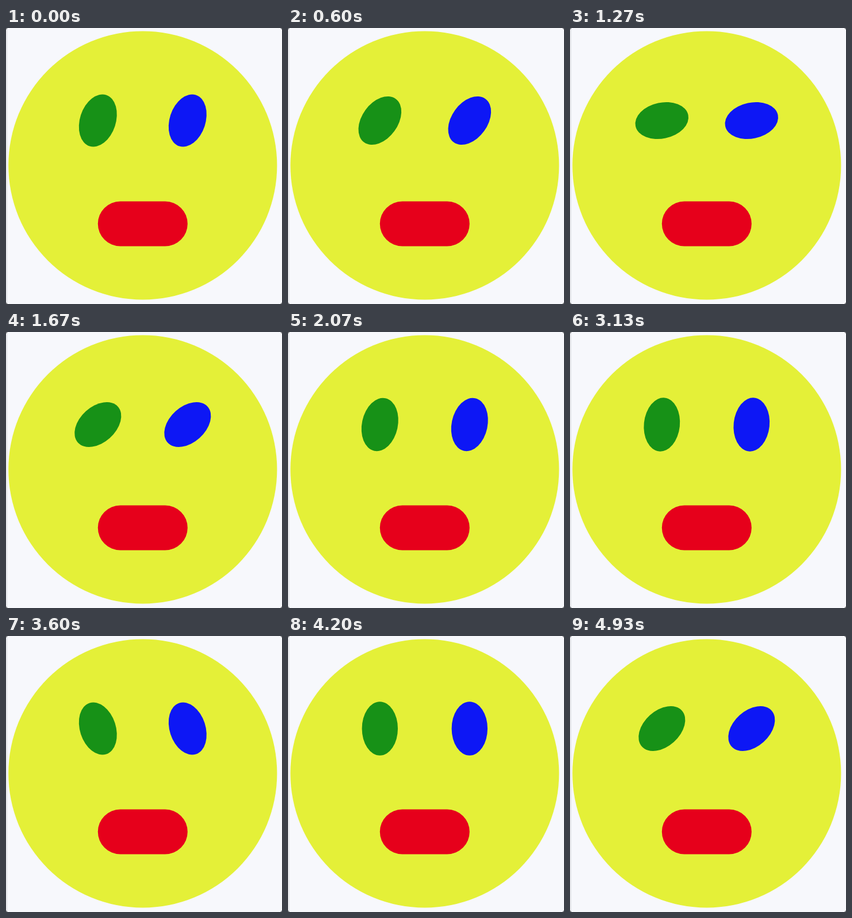
An HTML page with a canvas for the animation above (4.99 s loop, 480 by 480 pixels).

```html
<!DOCTYPE html>
<html lang="en">
<head>
<meta charset="utf-8">
<title>Rolling eyes</title>
<style>
html, body { margin: 0; width: 100%; height: 100%; overflow: hidden; background: #f7f8fc; }
canvas { display: block; width: 480px; height: 480px; }
</style>
</head>
<body>
<canvas id="stage" width="480" height="480"></canvas>
<script>
const ctx = document.getElementById('stage').getContext('2d');
const LOOP = 4990;
const SIZE = 480;
const TICK = 6; // degrees per rotation step

// [step, degrees]: a nearly steady clockwise spin
const SPIN = [[0, 18], [19, 438], [31, 732], [40, 930], [54, 1242], [63, 1440], [74, 1668]];

const startOf = step => Math.round(step * 20 / 3) * 10;

function stepAt(time) {
  const step = Math.floor((time + 5) * 3 / 200);
  return Math.min(74, startOf(step) > time ? step - 1 : step);
}

function angleAt(step) {
  let i = 0;
  while (i < SPIN.length - 2 && step >= SPIN[i + 1][0]) i++;
  const [s0, a0] = SPIN[i];
  const [s1, a1] = SPIN[i + 1];
  const deg = a0 + (a1 - a0) * (step - s0) / (s1 - s0);
  return Math.round(deg / TICK) * TICK * Math.PI / 180;
}

function ellipse(x, y, rx, ry, angle, color) {
  ctx.fillStyle = color;
  ctx.beginPath();
  ctx.ellipse(x, y, rx, ry, angle, 0, Math.PI * 2);
  ctx.fill();
}

function corner(x, y, dx, dy) {
  ctx.beginPath();
  ctx.moveTo(x, y);
  ctx.lineTo(x + 3 * dx, y);
  ctx.lineTo(x, y + 3 * dy);
  ctx.fill();
}

function backdrop() {
  ctx.fillStyle = '#f7f8fc';
  ctx.fillRect(0, 0, SIZE, SIZE);
  ctx.fillStyle = '#e6e7eb';
  ctx.fillRect(0, 0, 2.5, SIZE);
  ctx.fillStyle = '#77787c';
  corner(0, 0, 1, 1);
  corner(SIZE, 0, -1, 1);
  corner(0, SIZE, 1, -1);
  corner(SIZE, SIZE, -1, -1);
}

function draw(time) {
  const angle = angleAt(stepAt(time));
  backdrop();
  ellipse(237.8, 239, 233.6, 233.6, 0, '#e4f038');
  ellipse(159.8, 161, 31.2, 46.8, angle, '#179117');
  ellipse(315.8, 161, 31.2, 46.8, angle, '#0d17f5');
  ctx.fillStyle = '#e6001b';
  ctx.beginPath();
  ctx.roundRect(159.8, 301.5, 156, 78, 39);
  ctx.fill();
}

const begin = performance.now();
function tick() {
  draw((performance.now() - begin) % LOOP);
  requestAnimationFrame(tick);
}
tick();
</script>
</body>
</html>
```
